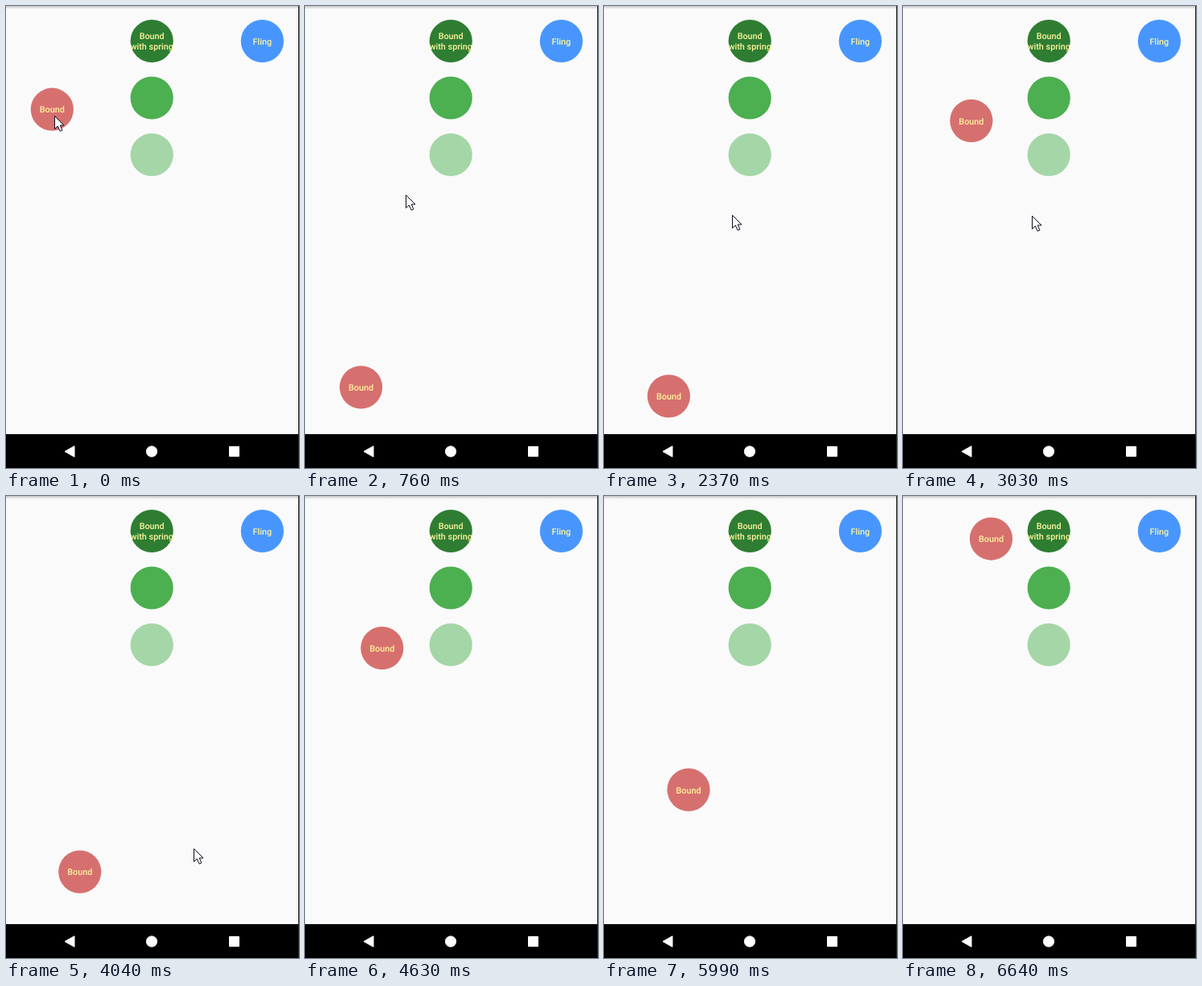
Write an HTML page that moves like this. It is 364 px wide and 573 px high and loops after 6740 ms.

```html
<!DOCTYPE html>
<html lang="en">
<head>
<meta charset="utf-8">
<title>Bouncing ball</title>
<style>
  html, body { margin: 0; width: 100%; height: 100%; overflow: hidden; background: #fafafa; }
  svg { display: block; width: 364px; height: 573px; }
  text {
    font: 500 10.8px Roboto, Arial, sans-serif;
    fill: #fff59d; text-anchor: middle; text-rendering: geometricPrecision;
  }
</style>
</head>
<body>
<svg viewBox="0 0 364 573">
  <defs>
    <linearGradient id="shade" x2="0" y2="1">
      <stop offset="0" stop-color="#c6c6c6"/>
      <stop offset="1" stop-color="#fafafa"/>
    </linearGradient>
  </defs>
  <rect width="364" height="573" fill="#fafafa"/>
  <rect width="364" height="4" fill="url(#shade)"/>

  <circle cx="181.2" cy="43.5" r="26.6" fill="#2e7d32"/>
  <text x="181.2" y="41.4">Bound</text>
  <text x="181.2" y="54.1">with spring</text>
  <circle cx="181.2" cy="114" r="26.6" fill="#4caf50"/>
  <circle cx="181.2" cy="184.5" r="26.6" fill="#a5d6a7"/>
  <circle cx="318.4" cy="43.5" r="26.6" fill="#4896fd"/>
  <text x="318.4" y="47.7">Fling</text>

  <g id="ball">
    <circle r="26.6" fill="#d6706f"/>
    <text y="4.2">Bound</text>
  </g>

  <rect y="531" width="364" height="42"/>
  <g fill="#fff" stroke="#fff" stroke-linejoin="round">
    <path d="M73 552.5L85 545.8V559.2Z"/>
    <circle cx="181" cy="552.5" r="6.6"/>
    <rect x="277.5" y="546.5" width="12" height="12"/>
  </g>
  <rect x="363" width="1" height="573" fill="#222"/>

  <path id="cursor" d="M.5 .5V16.5L4.3 13L7.1 19.2L9.9 18L7.3 12H12Z"
        fill="#fff" stroke="#0c0c1c" stroke-linejoin="round"/>
</svg>
<script>
const LOOP = 6740, STEP = 59.3, FIRST_STEP = 48;
const RADIUS = 26.5, TRAVEL = 478;

// Times of touching the edges: top, bottom, top, ...
const bounces = [-190, 703, 1557, 2397, 3210, 4092, 4882, 5727, 6583, 7435];

// Pointer path: time, x, y
const path = [
  [0, 60, 136], [760, 125, 234], [1410, 158, 258], [3150, 160, 260],
  [3570, 173, 334], [4040, 236, 441], [4270, 228, 509]
];
const POINTER_GONE = 4320;

const mix = (a, b, k) => a + (b - a) * k;

// The picture refreshes in steps
const snap = time =>
  Math.max(0, FIRST_STEP + STEP * Math.floor((time - FIRST_STEP) / STEP));

function ballAt(t) {
  const i = bounces.findIndex(b => b > t);
  const k = (t - bounces[i - 1]) / (bounces[i] - bounces[i - 1]);
  const drag = 7.1 * Math.max(0, 1 - t / 120);
  return [64.4 + 0.0068 * t - drag, RADIUS + TRAVEL * (i % 2 ? k : 1 - k)];
}

function pointerAt(t) {
  const i = path.findIndex(p => p[0] > t);
  if (i < 0) return path[path.length - 1].slice(1);
  const [t0, x0, y0] = path[i - 1], [t1, x1, y1] = path[i];
  const k = (t - t0) / (t1 - t0);
  return [Math.round(mix(x0, x1, k)), Math.round(mix(y0, y1, k))];
}

const ball = document.getElementById("ball");
const cursor = document.getElementById("cursor");
const place = (el, [x, y]) => el.setAttribute("transform", `translate(${x} ${y})`);

function draw(time) {
  const t = snap(time % LOOP);
  place(ball, ballAt(t));
  place(cursor, pointerAt(t));
  cursor.style.display = t < POINTER_GONE ? "" : "none";
}

let start;
function loop(now) {
  start ??= now;
  draw(now - start);
  requestAnimationFrame(loop);
}
draw(0);
requestAnimationFrame(loop);
</script>
</body>
</html>
```
